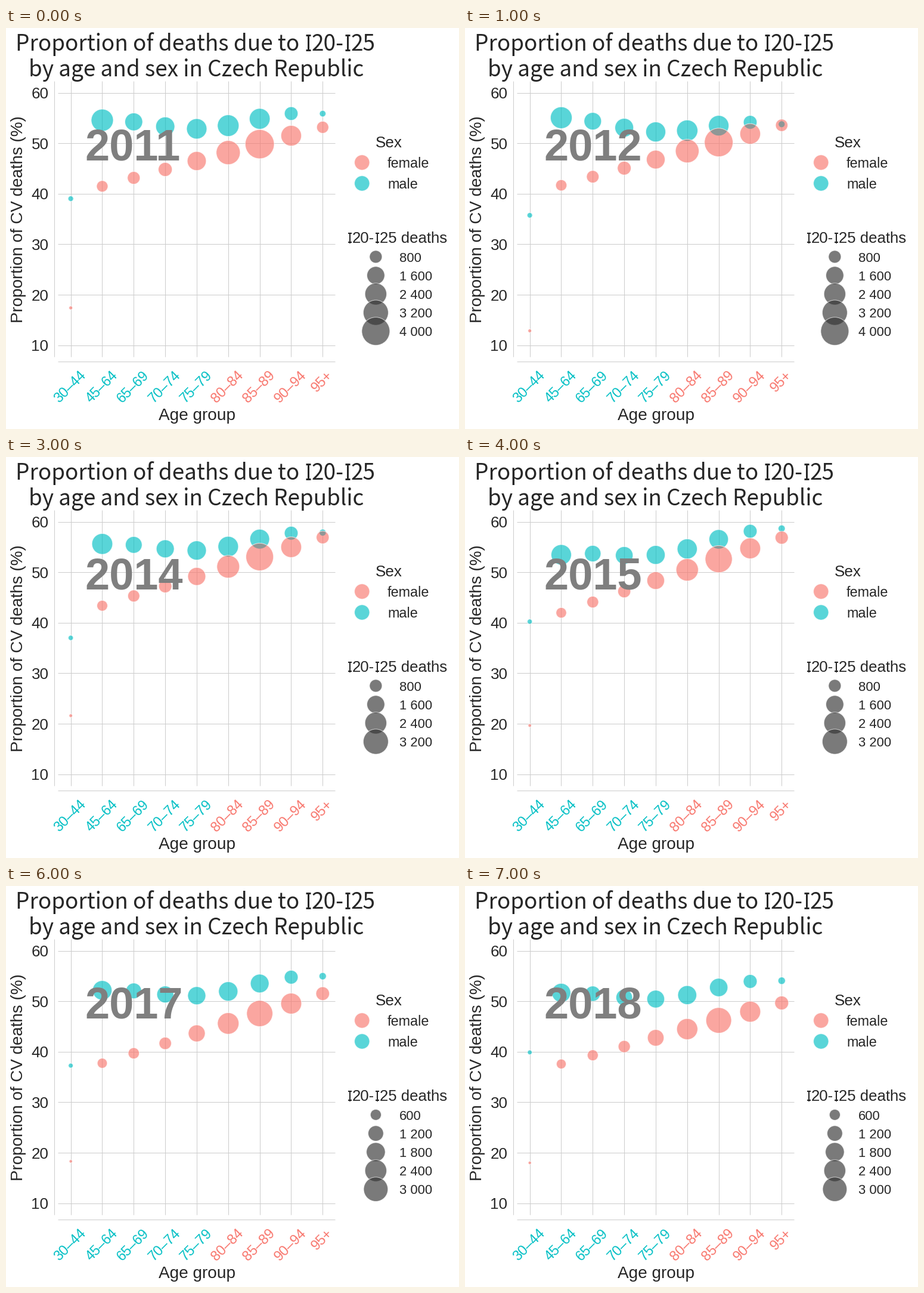
A matplotlib script for the animation above (8 s loop, 760 px wide and 672 px high).

```python
import math

import matplotlib.pyplot as plt
import numpy as np
from matplotlib.animation import ArtistAnimation
from matplotlib.patches import Circle
from matplotlib.textpath import TextPath

W, H, DPI = 760, 672, 100
PT = 72 / DPI
SANS, HUMANIST = "Liberation Sans", "Noto Sans CJK JP"
INK, GRID, YEAR, OVERLAP = "#262626", "#cccccc", "#7f7f7f", "#8f9796"
PINK, TEAL, NEUTRAL = "#f8766d", "#00bfc4", "#333333"

AGES = ["30–44", "45–64", "65–69", "70–74", "75–79",
        "80–84", "85–89", "90–94", "95+"]
YEARS = range(2011, 2019)

# Key shares in percent: youngest group, then both ends of the older trend.
KEY_YEARS = [2011, 2012, 2013, 2015, 2016, 2018]
MALE = {
    "young": [39.05, 35.75, 33.8, 40.25, 34.65, 39.9],
    "start": [53.4, 53.9, 56.6, 52.3, 51.5, 50.5],
    "end": [55.0, 52.9, 56.2, 57.8, 55.0, 53.2],
}
FEMALE = {
    "young": [17.4, 12.85, 23.55, 19.65, 18.6, 18.0],
    "start": [41.5, 41.7, 44.8, 42.0, 37.9, 37.6],
    "end": [53.2, 53.6, 57.0, 56.9, 53.4, 49.7],
}

fig = plt.figure(figsize=(W / DPI, H / DPI), dpi=DPI, facecolor="white")
ax = fig.add_axes([0, 0, 1, 1])
ax.set_xlim(0, W)
ax.set_ylim(H, 0)
ax.axis("off")


def age_x(i):
    return 108.65 + 52.83 * i


def share_y(v):
    return 108.9 + (60 - v) * 8.453


def shares(keys, year, ripple=0):
    """Youngest share, then a straight trend with a gentle wave on it."""
    young, start, end = (np.interp(year, KEY_YEARS, k) for k in keys.values())
    trend = np.linspace(start, end, 8) + ripple * np.cos(np.arange(8))
    return [young, *trend]


def radii(year, ages, sizes):
    """Bubbles shrink over the years, except in the oldest groups."""
    i = np.arange(len(AGES))
    change = np.interp(i, [0, 6, 8], [-0.15, -0.12, 0.15])
    return np.interp(i, ages, sizes) * (1 + change * (year - 2011) / 7)


def line(x0, y0, x1, y1, color=GRID, width=1, z=1):
    ax.plot([x0, x1], [y0, y1], color=color, lw=width * PT, zorder=z,
            solid_capstyle="butt")


def label(x, y, s, px, font=SANS, ha="left", va="baseline", **kw):
    kw.setdefault("color", INK)
    return ax.text(x, y, s, fontsize=px * PT, family=font, ha=ha, va=va, **kw)


def advance(s, px, font):
    def right(t):
        return TextPath((0, 0), t, size=px, prop={"family": font}).get_extents().x1
    return right(s + "l") - right("l")


def serif_i(x, y, px, cap):
    thick, half = 0.08 * px, 0.115 * px
    top = y - cap * px
    line(x, y, x, top, INK, thick, 3)
    for bar in (y - thick / 2, top + thick / 2):
        line(x - half, bar, x + half, bar, INK, thick, 3)


def barred(x, y, s, px, font, cap):
    """Text in which every capital I carries short bars."""
    for n, part in enumerate(s.split("I")):
        if n:
            serif_i(x + 0.165 * px, y, px, cap)
            x += 0.33 * px
        if part:
            label(x, y, part, px, font)
            x += advance(part, px, font)


def bubble(x, y, r, color, z):
    return ax.add_patch(Circle((x, y), r, facecolor=color, edgecolor="white",
                               lw=PT, alpha=0.65, zorder=z))


def overlap(x, ym, rm, yf, rf):
    patch = Circle((x, ym), rm - 0.5, color=OVERLAP, lw=0, zorder=4)
    ax.add_patch(patch)
    patch.set_clip_path(Circle((x, yf), rf - 1, transform=ax.transData))
    return patch


def draw_static():
    barred(15.5, 38, "Proportion of deaths due to I20-I25", 37, HUMANIST, 0.733)
    label(319.5, 81, "by age and sex in Czech Republic", 37, HUMANIST, "center")

    for v in range(10, 61, 10):
        y = share_y(v)
        line(87, y, 552, y)
        label(71.5, y + 9.5, str(v), 26, ha="right")
    for i, age in enumerate(AGES):
        x = age_x(i)
        line(x, 89, x, 551)
        label(x - 1, 570, age, 23.4, ha="center", va="top", rotation=45,
              color=TEAL if i < 5 else PINK)
    line(81.2, 89, 81.2, 551)
    line(87, 558.7, 552, 558.7)

    label(320, 657, "Age group", 28, ha="center")
    label(28.5, 320.5, "Proportion of CV deaths (%)", 27.8, ha="center",
          rotation=90, rotation_mode="anchor")

    label(642, 199.5, "Sex", 26, ha="center")
    for y, name, color in ((225.4, "female", PINK), (260.4, "male", TEAL)):
        bubble(597.3, y, 12.7, color, 2)
        label(640, y + 8.6, name, 23.4)
    barred(572.5, 360.5, "I20-I25 deaths", 25.8, SANS, 0.69)


def size_legend(year):
    step, count = (600, 5) if year > 2015 else (800, 4 if year > 2013 else 5)
    parts = []
    for k in range(count):
        n, y = step * (k + 1), 383.4 + 31.2 * k
        parts.append(bubble(620.4, y, 0.3716 * math.sqrt(n), NEUTRAL, 2 + k / 10))
        parts.append(label(660, y + 8.2, f"{n:,}".replace(",", " "), 22))
    return parts


def draw_year(year):
    male, female = shares(MALE, year, ripple=1.2), shares(FEMALE, year)
    male_r = radii(year, [0, 1, 2, 5, 6, 8], [4.5, 18.5, 14.8, 18, 17.3, 5.3])
    female_r = radii(year, [0, 1, 3, 6, 8], [3, 9.5, 11.6, 24.3, 10])
    parts = size_legend(year)
    for i, (m, f, rm, rf) in enumerate(zip(male, female, male_r, female_r)):
        x, ym, yf = age_x(i), share_y(m), share_y(f)
        parts += [bubble(x, ym, rm, TEAL, 2), bubble(x, yf, rf, PINK, 3)]
        if abs(ym - yf) < rm + rf:
            parts.append(overlap(x, ym, rm, yf, rf))
    parts.append(label(132.5, 222, str(year), 74, weight="bold", color=YEAR,
                       zorder=5))
    return parts


draw_static()
anim = ArtistAnimation(fig, [draw_year(y) for y in YEARS], interval=1000,
                       repeat=True, repeat_delay=0, blit=False)
plt.show()
```
